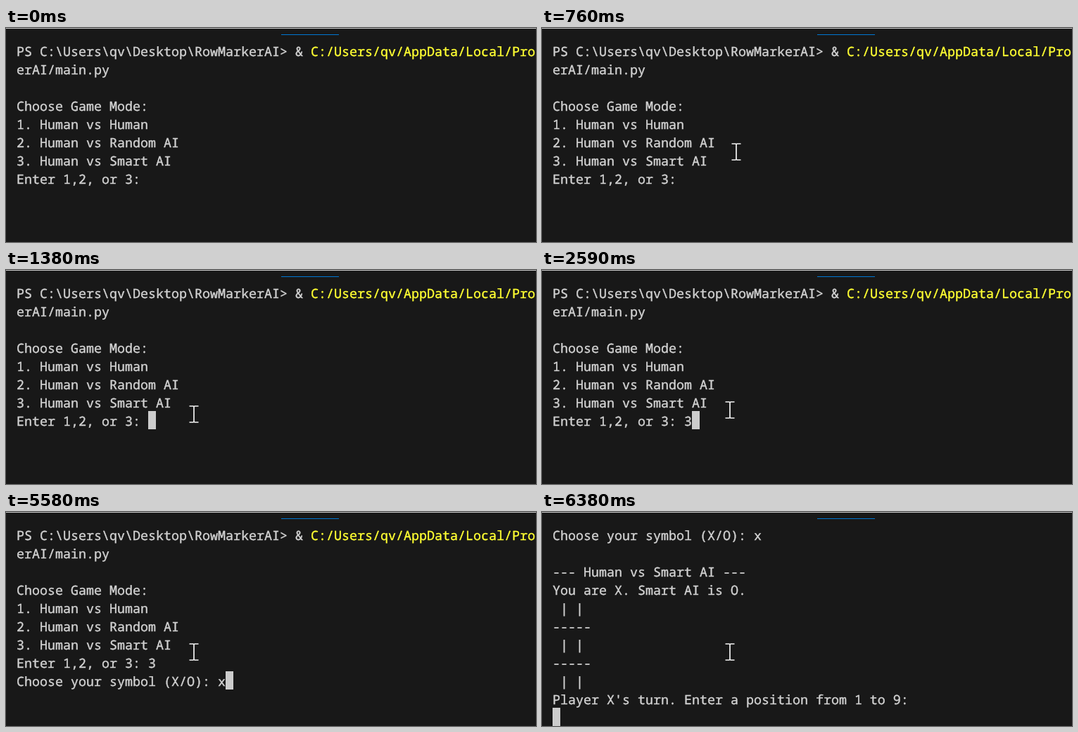
These frames come from a looping animation (753x305 px, 8000 ms). An HTML page:

```html
<!DOCTYPE html>
<html lang="en">
<head>
<meta charset="utf-8">
<title>Terminal game</title>
<style>
  html, body { margin: 0; width: 100%; height: 100%; overflow: hidden; background: #181818; }
  svg { display: block; width: 753px; height: 305px; }
  text {
    font: 18.333px "Noto Sans Mono", "DejaVu Sans Mono", monospace;
    font-variant-ligatures: none;
    text-rendering: geometricPrecision;
    white-space: pre;
    fill: #d2d2d2;
    stroke: #d2d2d2;
    stroke-width: 0.4px;
  }
  .path { fill: #ffff32; stroke: #ffff32; }
  #under { fill: #181818; stroke: #181818; }
</style>
</head>
<body>
<svg viewBox="0 0 753 305">
  <rect width="753" height="305" fill="#181818"/>
  <rect width="753" height="1" fill="#c4c4c4"/>
  <rect x="391" y="9" width="82" height="1" fill="#0078d4"/>
  <g id="lines"></g>
  <rect id="caret" width="11" height="26" fill="#ccc"/>
  <text id="under"></text>
  <path id="mouse" d="M-6.5-11.5H-1L0-10.5L1-11.5H6.5M-6.5 11.5H-1L0 10.5L1 11.5H6.5M0-10.5V10.5" fill="none" stroke="#f4f4f4" stroke-width="1.7"/>
</svg>
<script>
const LOOP = 8000, LEFT = 15, TOP = 19, CELL = 11, ROW = 26, BASE = 21;
const $ = id => document.getElementById(id);

const command = "PS C:\\Users\\qv\\Desktop\\RowMarkerAI> & ";
const script = "C:/Users/qv/AppData/Local/Pro";
const ask = "Enter 1,2, or 3: ";
const pick = "Choose your symbol (X/O): ";
const menu = [
  command, "erAI/main.py", "", "Choose Game Mode:",
  "1. Human vs Human", "2. Human vs Random AI", "3. Human vs Smart AI"
];
const board = [" | |", "-----", " | |", "-----", " | |"];
const game = [
  pick + "x", "", "--- Human vs Smart AI ---", "You are X. Smart AI is O.",
  ...board, "Player X's turn. Enter a position from 1 to 9:"
];

// Each screen: start time, lines, caret [column, row]
const screens = [
  [0, [...menu, ask], null],
  [1380, [...menu, ask], [17, 7]],
  [2590, [...menu, ask + "3"], [18, 7]],
  [3780, [...menu, ask + "3", pick], [26, 8]],
  [5580, [...menu, ask + "3", pick + "x"], [27, 8]],
  [6310, [ask + "3", ...game], [0, 10]],
  [6380, game, [0, 10]]
];

// Pointer moves: time, x, y
const moves = [
  [410, 429, 215.5], [550, 345, 194], [690, 288, 179], [760, 276, 176.5],
  [830, 268, 172.5], [900, 267, 179], [1040, 275, 198.5],
  [1240, 275, 198.5], [1380, 267, 205.5],
  [1660, 267, 205.5], [1860, 267, 199.5]
];

function addText(parent, col, row, str, cls) {
  const t = document.createElementNS("http://www.w3.org/2000/svg", "text");
  t.setAttribute("x", LEFT + col * CELL);
  t.setAttribute("y", TOP + row * ROW + BASE);
  if (cls) t.setAttribute("class", cls);
  t.textContent = str;
  parent.append(t);
}

function drawScreen([, lines, caret]) {
  const g = $("lines");
  g.replaceChildren();
  lines.forEach((str, row) => {
    addText(g, 0, row, str);
    if (str === command) addText(g, command.length, row, script, "path");
  });
  $("caret").style.display = caret ? "" : "none";
  $("under").textContent = "";
  if (!caret) return;
  const [col, row] = caret;
  const x = LEFT + col * CELL, y = TOP + row * ROW;
  $("caret").setAttribute("x", x);
  $("caret").setAttribute("y", y);
  $("under").setAttribute("x", x);
  $("under").setAttribute("y", y + BASE);
  $("under").textContent = (lines[row] || "")[col] || "";
}

function pointerAt(t) {
  const next = moves.findIndex(m => m[0] > t);
  if (next < 0) return moves[moves.length - 1].slice(1);
  const [t0, x0, y0] = moves[next - 1], [t1, x1, y1] = moves[next];
  // The pointer is redrawn about every 70 ms
  const held = Math.min(t1, t0 + Math.floor((t - t0) / 70 + 0.001) * 70);
  const k = (held - t0) / (t1 - t0);
  return [x0 + (x1 - x0) * k, y0 + (y1 - y0) * k];
}

let shown = null;
function render(t) {
  const screen = screens.filter(s => s[0] <= t).pop();
  if (screen !== shown) drawScreen(shown = screen);
  const visible = t >= moves[0][0];
  $("mouse").style.display = visible ? "" : "none";
  if (visible) $("mouse").setAttribute("transform", `translate(${pointerAt(t)})`);
}

let start = null;
function tick(now) {
  if (start === null) start = now;
  render((now - start) % LOOP);
  requestAnimationFrame(tick);
}
render(0);
requestAnimationFrame(tick);
</script>
</body>
</html>
```
